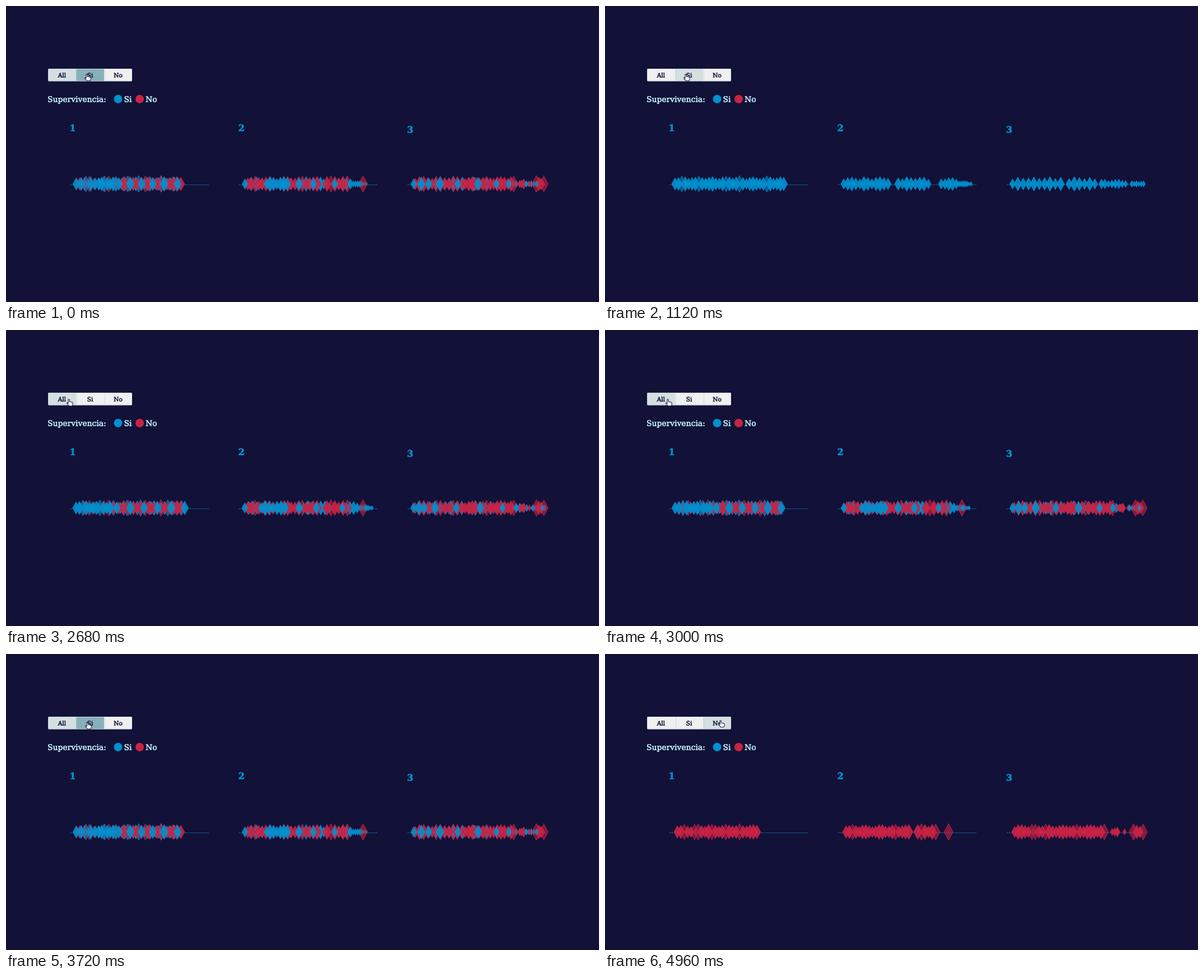
These frames come from a looping animation (1058x529 px, 5 s). A matplotlib script:

```python
import numpy as np
import matplotlib.pyplot as plt
from matplotlib.animation import FuncAnimation
from matplotlib.collections import PolyCollection
from matplotlib.colors import to_rgba
from matplotlib.patches import Circle, FancyBboxPatch, Polygon, Rectangle
from matplotlib.patheffects import withStroke

W, H, DPI = 1058, 529, 100
LOOP, STEP = 5000, 40
CLICK_SI, CLICK_ALL, CLICK_NO, MOVE = 240, 2560, 4400, 1000

NAVY, BLUE, RED, PALE, INK = "#121138", "#0090cf", "#c92345", "#bdebf7", "#1d1a45"
PLAIN, ACTIVE, HOVER = "#f0f0f0", "#d5dfe0", "#88b0bb"
AXIS_Y, AXIS_LEN, PANEL_GAP = 318, 247, 301
PX = 72 / DPI

rng = np.random.default_rng(7)


def ease(u):
    u = min(max(u, 0), 1)
    return 4 * u**3 if u < 0.5 else 1 - 4 * (1 - u)**3


def smooth(t, start, stop):
    u = np.clip((t - start) / (stop - start), 0, 1)
    return u * u * (3 - 2 * u)


class Group:
    """Diamonds of one colour: 'alone' when filtered, 'home' among all."""

    def __init__(self, color, left, pitch, spans, shift, lead=(0, 0)):
        self.color = color
        xs, hs = [], []
        for start, stop, mean in spans:
            x = np.linspace(start, stop, 1 + round((stop - start) / (pitch * mean)))
            wave = 1 + 0.15 * np.cos(2 * np.pi * (x - 140) / 25)
            xs.append(x)
            hs.append(np.minimum(mean * wave + rng.uniform(-1, 1, len(x)), 15))
        self.alone, self.h = np.concatenate(xs), np.concatenate(hs)
        self.home = self.alone - np.interp((self.alone - left) / AXIS_LEN, *shift)
        # Blue lies over red inside the lead span and at every fourth diamond.
        self.front = (self.home >= lead[0]) & (self.home <= lead[1])
        self.front[::4] = True

    def diamonds(self, progress, front):
        xs = self.home + (self.alone - self.home) * progress
        pick = self.front == front
        for x, h in zip(xs[pick], self.h[pick]):
            w = 0.52 * h + 0.4
            shape = [(x - w, AXIS_Y), (x, AXIS_Y - h), (x + w, AXIS_Y), (x, AXIS_Y + h)]
            yield shape, to_rgba(self.color, 0.6 if h >= 13.8 else 0.92)


LEFTS = [114 + PANEL_GAP * i for i in range(3)]
BLUE_SHIFT = ([0.04, 0.15, 0.43, 0.76, 1], [0, -11, 0, 14, 10])
THIRDS = np.linspace(0, 1, 4)

blues = [
    Group(BLUE, LEFTS[0], 0.5, [(125, 319, 12.2)], BLUE_SHIFT, (128, 196)),
    Group(BLUE, LEFTS[1], 0.65, [(426, 505, 11.5), (523, 577, 11.5), (600, 627, 10.8),
                                 (632, 653, 5)], BLUE_SHIFT, (466, 503)),
    Group(BLUE, LEFTS[2], 0.8, [(727, 813, 11.5), (828, 874, 11), (886, 929, 7.5),
                                (940, 961, 5.5)], BLUE_SHIFT, (740, 760)),
]
reds = [
    Group(RED, LEFTS[0], 0.5, [(129, 271, 12.4)], (THIRDS, [4, -30, -42, -42])),
    Group(RED, LEFTS[1], 0.5, [(430, 542, 12), (558, 590, 13), (613, 613, 14.5)],
          (THIRDS, [0, -8, -17, -34])),
    Group(RED, LEFTS[2], 0.5, [(731, 891, 12.2), (905, 914, 8), (927, 927, 6),
                               (943, 960, 13)], (THIRDS, [4, -14, -17, 1])),
]

fig = plt.figure(figsize=(W / DPI, H / DPI), dpi=DPI, facecolor=NAVY)
ax = fig.add_axes([0, 0, 1, 1])
ax.set_xlim(0, W)
ax.set_ylim(H, 0)
ax.axis("off")


def label(x, y, text, size, color, **kw):
    ax.text(x, y, text, fontsize=size * PX, color=color, family="DejaVu Serif",
            zorder=5, path_effects=[withStroke(linewidth=0.35, foreground=color)], **kw)


# Filter buttons
def frame_box(**kw):
    box = FancyBboxPatch((76.5, 113.5), 147, 19.5, lw=0.7,
                         boxstyle="round,pad=1,rounding_size=1.5", **kw)
    return ax.add_patch(box)


outline = frame_box(fc=PLAIN, ec=PLAIN, zorder=2)
frame_box(fc="none", ec="#a9d3de", ls=(0, (2, 1.5)), zorder=4)
buttons = []
for i, name in enumerate(("All", "Si", "No")):
    button = Rectangle((75 + 50 * i, 112), 50, 22, fc=PLAIN, ec="none", zorder=3)
    buttons.append(ax.add_patch(button))
    button.set_clip_path(outline)
    label(100 + 50 * i, 127.5, name, 10.6, INK, ha="center")
for x in (125.5, 175.5):
    ax.plot([x, x], [113, 134], color="#a9d3de", lw=0.7, ls=(0, (2, 1.5)), zorder=4)

# Legend
label(74, 171.5, "Supervivencia:", 13.9, PALE)
for x, color, name in ((200, BLUE, "Si"), (238.5, RED, "No")):
    ax.add_patch(Circle((x, 166.3), 7.5, fc=color, ec="none"))
    label(x + 10.5, 171.5, name, 13.9, PALE)

# Panel titles and axes
for i, left in enumerate(LEFTS):
    label(left - 0.5, 226.5 if i == 2 else 223.5, str(i + 1), 16, BLUE, weight="bold")
    ax.plot([left, left + AXIS_LEN], [AXIS_Y + 0.5] * 2, color=BLUE, alpha=0.5,
            lw=0.72, zorder=1)
    ax.vlines(np.arange(left + 0.5, left + AXIS_LEN, 5), AXIS_Y, AXIS_Y + 1.5,
              color=BLUE, alpha=0.35, lw=0.6, zorder=1)

marks = PolyCollection([], linewidths=0.5, zorder=2)
ax.add_collection(marks)

HAND = 0.9 * np.array([(-1, 0), (1, 0), (1.6, 4.6), (4, 4.8), (6.8, 5.8), (8, 7.2),
                       (8, 10), (6.5, 13), (0.5, 13), (-2.3, 9.8), (-4, 7.4),
                       (-3, 6.4), (-1, 8)])
hand = Polygon(HAND, fc="#f6f6f6", ec=INK, lw=0.75, joinstyle="round", zorder=8)
ax.add_patch(hand)


def pointer(t):
    """Rest on Si, move to All, then on to No."""
    si, all_, no = np.array([(144, 122), (112, 124), (206, 119)])
    return (si + (all_ - si) * smooth(t, 1440, 2040)
            + (no - all_) * smooth(t, 3400, 4200))


def draw(frame):
    t = frame * STEP
    blue_move = ease((t - CLICK_SI) / MOVE) - ease((t - CLICK_ALL) / MOVE)
    # The loop ends part of the way through the last move.
    red_move = ease((t - CLICK_NO) / MOVE) / ease((LOOP - STEP - CLICK_NO) / MOVE)
    show_blue = t < CLICK_NO
    show_red = t < CLICK_SI or t >= CLICK_ALL

    shapes = []
    for blue, red in zip(blues, reds):
        if show_blue:
            shapes += blue.diamonds(blue_move, False)
        if show_red:
            shapes += red.diamonds(red_move, False)
            shapes += red.diamonds(red_move, True)
        if show_blue:
            shapes += blue.diamonds(blue_move, True)
    marks.set_verts([s for s, _ in shapes])
    marks.set_facecolor([c for _, c in shapes])
    marks.set_edgecolor([(*c[:3], 0.9) for _, c in shapes])

    tip = pointer(t)
    hand.set_xy(HAND + tip)
    hovered = int((tip[0] - 75) // 50)
    active = 1 if CLICK_SI <= t < CLICK_ALL else 2 if t >= CLICK_NO else 0
    for i, button in enumerate(buttons):
        button.set_facecolor(ACTIVE if i == active else HOVER if i == hovered else PLAIN)
    return [marks, hand, *buttons]


anim = FuncAnimation(fig, draw, frames=LOOP // STEP, interval=STEP, repeat=True,
                     repeat_delay=0, blit=False)
plt.show()
```
